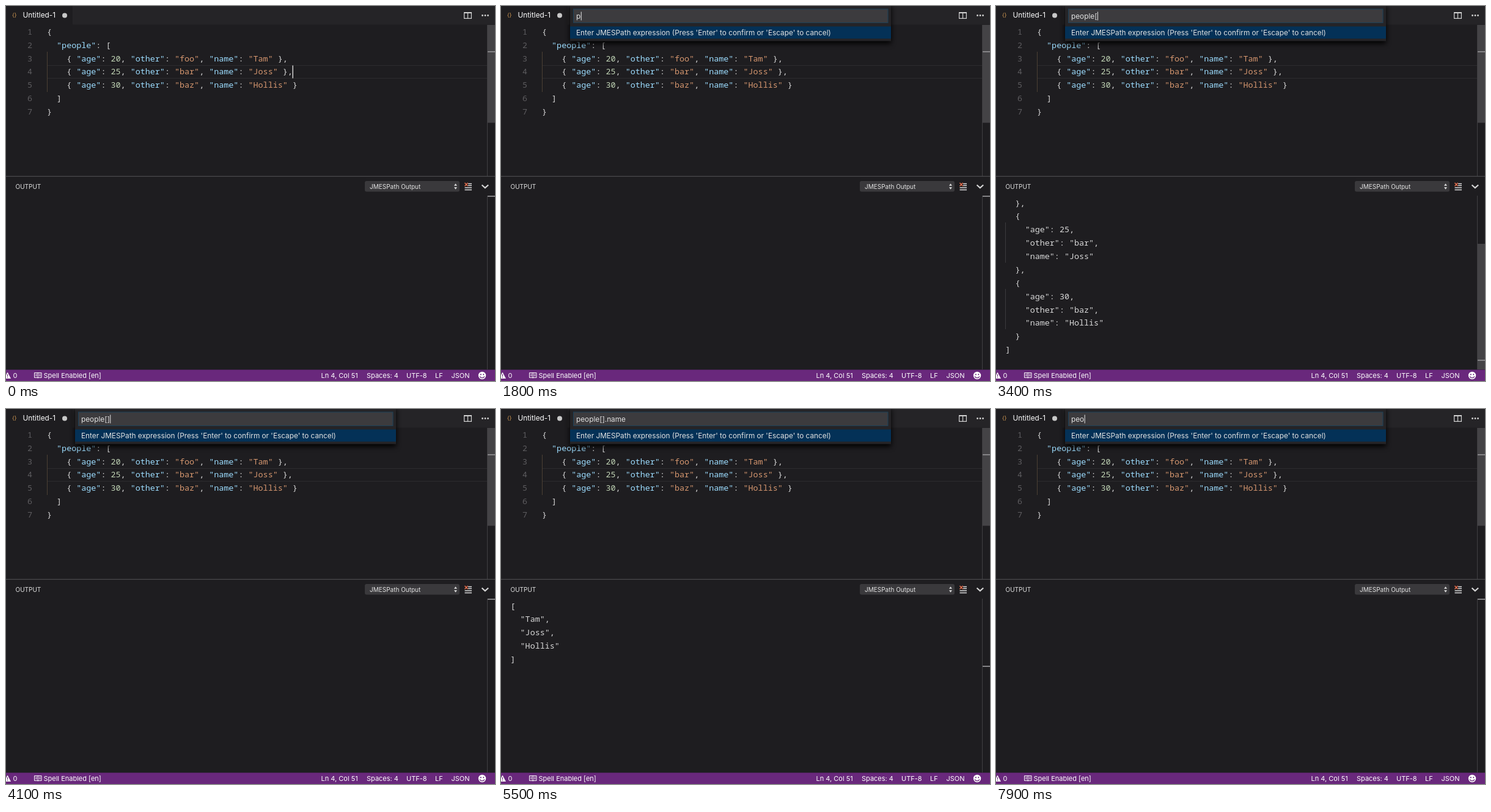
Write an HTML page that moves like this. It is 800 px wide and 615 px high and loops after 8 s.

```html
<!DOCTYPE html>
<html lang="en">
<head>
<meta charset="utf-8">
<title>JMESPath query</title>
<style>
  html, body { margin: 0; width: 100%; height: 100%; overflow: hidden; background: #1e1d20; }
  svg { display: block; width: 800px; height: 615px; }
  text { white-space: pre; font-family: Inter, sans-serif; fill: #e2e2e2; }
  .code text { font: 13.4px "Noto Sans Mono", "DejaVu Sans Mono", monospace; fill: #d8d8d8; }
  .code .num { fill: #5d5c5f; text-anchor: end; }
  .key { fill: #9cdcfe; }
  .str { fill: #d6976f; }
  .val { fill: #c2d5b6; }
  .title { font-size: 11.8px; }
  .panel text { font-size: 10px; }
  .status text { font-size: 11px; fill: #fff; }
  .line { fill: none; stroke: #d0d0d0; stroke-width: 1.2; }
  #palette { filter: drop-shadow(0 4px 4px #000); }
</style>
</head>
<body>
<svg viewBox="0 0 800 615">
  <rect width="800" height="615" fill="#1e1d20"/>

  <!-- tab bar -->
  <rect x="109" width="691" height="30.500" fill="#252427"/>
  <text x="10" y="18" font-size="9" style="fill:#d39a52">{}</text>
  <text class="title" x="27.500" y="19.300" style="fill:#fff">Untitled-1</text>
  <circle cx="96" cy="15.500" r="4" fill="#c8c8c8"/>
  <path class="line" d="M749.600 10.600h11.800v9.800h-11.800zM755.500 11v9M749 11.500h13"/>
  <g fill="#d0d0d0">
    <circle cx="779.500" cy="15.500" r="1.400"/><circle cx="784" cy="15.500" r="1.400"/><circle cx="788.500" cy="15.500" r="1.400"/>
  </g>

  <!-- editor -->
  <path d="M67 97.500H787M67 118.500H787" stroke="#2d2c2f"/>
  <path d="M67.500 75V141" stroke="#4b4034"/>
  <g id="editor" class="code"></g>
  <rect id="caret" x="468.500" y="97.500" width="1.500" height="21" fill="#d0d0d0"/>
  <rect x="788" y="31" width="12" height="160.500" fill="#444346"/>
  <path d="M787.500 31V279" stroke="#3f3e41"/>
  <path d="M788 75H800" stroke="#858487" stroke-width="2"/>

  <!-- output panel -->
  <path d="M0 279.300H800" stroke="#4a494c" stroke-width="1.200"/>
  <g class="panel">
    <text x="15.500" y="299.500">OUTPUT</text>
    <rect x="587" y="287" width="155" height="17.500" rx="3" fill="#3a393c"/>
    <text x="595" y="299.500">JMESPath Output</text>
  </g>
  <path d="M733 294.700l2.500-3.500 2.500 3.500zM733 297.300l2.500 3.500 2.500-3.500z" fill="#ddd"/>
  <path d="M756 291.500h6M756 294.500h6M750.500 298h11.500M750.500 301.500h11.500" stroke="#ddd" stroke-width="1.500"/>
  <path d="M750.500 290l5 5.500M755.500 290l-5 5.500" stroke="#e8714f" stroke-width="1.500"/>
  <path d="M778.500 293.500l5.300 4.700 5.300-4.700" fill="none" stroke="#d5d5d5" stroke-width="2.200"/>
  <g id="guides" stroke="#3c3b3e"><path d="M15.500 355V421M15.500 464V530"/></g>
  <g id="output" class="code"></g>
  <rect id="slider" x="788" y="390" width="12" height="206" fill="#444346"/>
  <path d="M787.500 311V596" stroke="#3f3e41"/>
  <rect id="mark" x="788" width="12" height="2" fill="#858487"/>

  <!-- status bar -->
  <rect y="596.500" width="800" height="18.500" fill="#69287c"/>
  <g class="status">
    <path d="M2.500 600.500L8 611H-3z" fill="#fff"/>
    <path d="M2.500 604v3.500M2.500 608.500v1.200" stroke="#69287c" stroke-width="1.200"/>
    <text x="11.500" y="610">0</text>
    <path d="M46.500 601.500h11.500v8h-11.500zM52.200 601.500v9M48 604h3M48 606.500h3M53.700 604h3M53.700 606.500h3" fill="none" stroke="#fff"/>
    <text x="61.500" y="610">Spell Enabled [en]</text>
    <text x="515.500" y="610">Ln 4, Col 51</text>
    <text x="590" y="610">Spaces: 4</text>
    <text x="655" y="610">UTF-8</text>
    <text x="702" y="610">LF</text>
    <text x="728.500" y="610">JSON</text>
    <circle cx="779" cy="606" r="6.200" fill="#fff"/>
    <circle cx="776.800" cy="604.300" r="1.100" fill="#69287c"/>
    <circle cx="781.200" cy="604.300" r="1.100" fill="#69287c"/>
    <path d="M775.300 607.300a3.800 3.300 0 0 0 7.400 0" fill="none" stroke="#69287c" stroke-width="1.300"/>
  </g>

  <!-- input palette -->
  <g id="palette">
    <rect x="113" y="-4" width="525" height="61.500" fill="#252427"/>
    <rect x="118.500" y="5" width="514.500" height="22.500" fill="#3c3b3e" stroke="#1b4059"/>
    <rect x="113" y="33.500" width="525" height="20" fill="#043157"/>
    <text id="query" class="title" x="123" y="20.500"></text>
    <rect id="inputCaret" y="9.500" width="1" height="14" fill="#e8e8e8"/>
    <text class="title" x="123" y="47.500">Enter JMESPath expression (Press 'Enter' to confirm or 'Escape' to cancel)</text>
  </g>
</svg>

<script>
const LOOP = 8000, BLINK = 500, LINE = 21.87;
const OPEN = 1200;
const FULL_QUERY = 'people[].name';
const el = id => document.getElementById(id);

const people = [
  { age: 20, other: 'foo', name: 'Tam' },
  { age: 25, other: 'bar', name: 'Joss' },
  { age: 30, other: 'baz', name: 'Hollis' }
];

// Colour keys, strings and numbers of one JSON line.
const paint = line => line.replace(/("\w+")(:?)|\d+/g, (m, word, colon) =>
  word ? `<tspan class="${colon ? 'key' : 'str'}">${word}</tspan>${colon}`
       : `<tspan class="val">${m}</tspan>`);

const rows = people.map((p, i) =>
  `    { "age": ${p.age}, "other": "${p.other}", "name": "${p.name}" }${i < 2 ? ',' : ''}`);
el('editor').innerHTML = ['{', '  "people": [', ...rows, '  ]', '}'].map((line, i) => {
  const y = 46.8 + i * LINE;
  return `<text class="num" x="43" y="${y}">${i + 1}</text><text x="67" y="${y}">${paint(line)}</text>`;
}).join('');

// [time, number of query characters]
const keys = [[OPEN, 0]];
const press = (start, step, from, to) => {
  const dir = Math.sign(to - from);
  for (let n = from, t = start; ; n += dir, t += step) {
    keys.push([t, n]);
    if (n === to) break;
  }
};
press(1700, 170, 1, 6);
press(3200, 700, 7, 8);
press(4450, 125, 9, 13);
press(7300, 0, 12, 12);
press(7600, 33, 11, 3);

const views = {
  empty: { lines: [], mark: 311 },
  people: { lines: JSON.stringify(people, null, 2).split('\n').slice(-12), mark: 580, long: true },
  names: { lines: JSON.stringify(people.map(p => p.name), null, 2).split('\n'), mark: 421 }
};
const results = [
  [0, 'empty'], [2700, 'people'], [4000, 'empty'], [4300, 'people'],
  [5100, 'empty'], [5450, 'names'], [7500, 'empty']
];

const latest = (list, t) => list.filter(([at]) => at <= t).pop();
const show = (id, on) => { el(id).style.display = on ? '' : 'none'; };
const lit = age => Math.floor(age / BLINK) % 2 === 0;

let shownView, shownQuery;

function setView(name) {
  if (name === shownView) return;
  shownView = name;
  const { lines, mark, long } = views[name];
  el('output').innerHTML = lines.map((line, i) =>
    `<text x="15.500" y="${327.6 + i * LINE}">${line}</text>`).join('');
  el('mark').setAttribute('y', mark);
  show('slider', long);
  show('guides', long);
}

function setQuery(text) {
  if (text === shownQuery) return;
  shownQuery = text;
  el('query').textContent = text;
  el('inputCaret').setAttribute('x', 123.5 + (text ? el('query').getComputedTextLength() : 0));
}

function draw() {
  const t = performance.now() % LOOP;
  const open = t >= OPEN;
  show('palette', open);
  show('caret', !open && lit(t));
  if (open) {
    const [at, count] = latest(keys, t);
    setQuery(FULL_QUERY.slice(0, count));
    show('inputCaret', lit(t - at));
  }
  setView(latest(results, t)[1]);
  requestAnimationFrame(draw);
}
draw();
</script>
</body>
</html>
```
